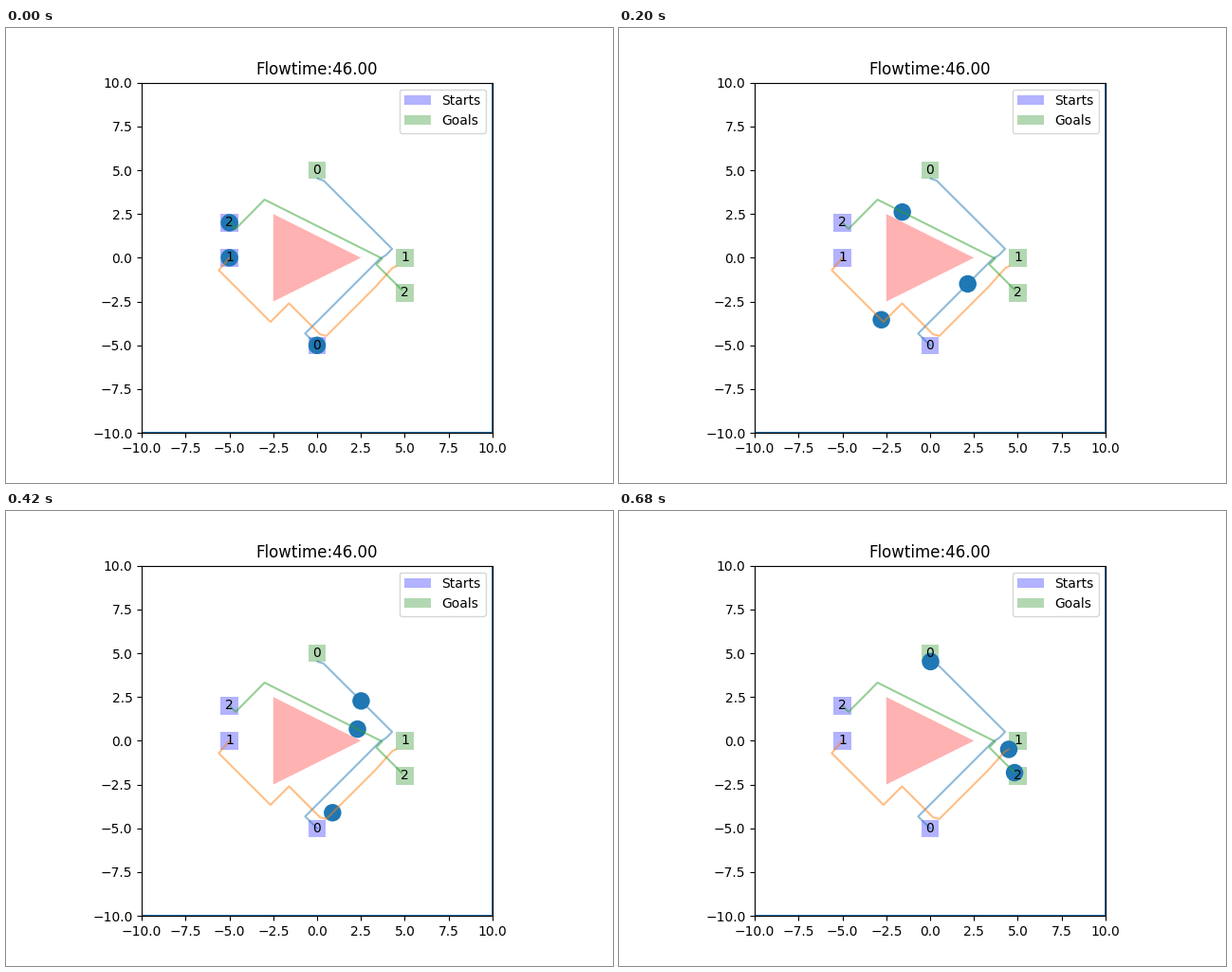
A matplotlib script for the animation above (0.7 s loop, 640 px wide and 480 px high).

```python
import math

import numpy as np
import matplotlib.pyplot as plt
from matplotlib.animation import FuncAnimation
from matplotlib.patches import Circle, Polygon, Rectangle

FRAMES, INTERVAL = 35, 20
LIMIT = 10
STRIDE = 0.5 / math.sqrt(2)  # longest move per frame along either axis

STARTS = [(0, -5), (-5, 0), (-5, 2)]
GOALS = [(0, 5), (5, 0), (5, -2)]
OBSTACLE = [(-2.5, 2.5), (-2.5, -2.5), (2.5, 0)]

# Turning points of each agent after its start.
TURNS = [
    [(-0.68, -4.32), (3.57, -0.07), (3.94, 0.16), (4.28, 0.51),
     (0.38, 4.40), (0.03, 4.52)],
    [(-5.61, -0.71), (-2.66, -3.66), (-1.60, -2.60), (0.17, -4.37),
     (0.53, -4.46), (3.35, -1.64), (4.29, -0.59), (4.49, -0.49)],
    [(-4.65, 1.65), (-3.00, 3.32), (3.71, -0.04), (3.38, -0.38),
     (4.82, -1.82)],
]


def walk(points):
    """Positions per frame: full strides, with a shorter one into each turn."""
    track = [points[0]]
    for a, b in zip(points, points[1:]):
        strides = np.abs(b - a).max() / STRIDE
        count = max(1, math.ceil(strides - 0.2))
        track += [a + (b - a) * i / strides for i in range(1, count)]
        track.append(b)
    return track


def add_squares(ax, points, color, label):
    for i, (x, y) in enumerate(points):
        ax.add_patch(Rectangle((x - 0.5, y - 0.5), 1, 1, facecolor=color,
                               edgecolor="none", alpha=0.3,
                               label=label if i == 0 else None))
        ax.text(x, y, str(i), ha="center", va="center")


plt.rcParams["text.kerning_factor"] = 6  # whole-pixel letter spacing

fig, ax = plt.subplots(figsize=(6.4, 4.8), dpi=100)
ax.set_aspect("equal")
ax.set_xlim(-LIMIT, LIMIT)
ax.set_ylim(-LIMIT, LIMIT)
ax.set_title("Flowtime:46.00")

border = LIMIT * np.array([(-1, -1), (1, -1), (1, 1), (-1, 1), (-1, -1)])
ax.plot(border[:, 0], border[:, 1], color="C0")

ax.add_patch(Polygon(OBSTACLE, facecolor="red", edgecolor="none", alpha=0.3))
add_squares(ax, STARTS, "blue", "Starts")
add_squares(ax, GOALS, "green", "Goals")

agents, tracks = [], []
for i, (start, turns) in enumerate(zip(STARTS, TURNS)):
    route = np.array([start] + turns, float)
    ax.plot(route[:, 0], route[:, 1], color=f"C{i}", alpha=0.5)
    agents.append(ax.add_patch(Circle(start, 0.5, facecolor="C0",
                                      edgecolor="none")))
    tracks.append(walk(route))

ax.legend(loc="upper right")


def update(step):
    for agent, track in zip(agents, tracks):
        agent.center = tuple(track[min(step, len(track) - 1)])
    return agents


anim = FuncAnimation(fig, update, frames=FRAMES, interval=INTERVAL,
                     repeat=True, repeat_delay=0)
plt.show()
```
